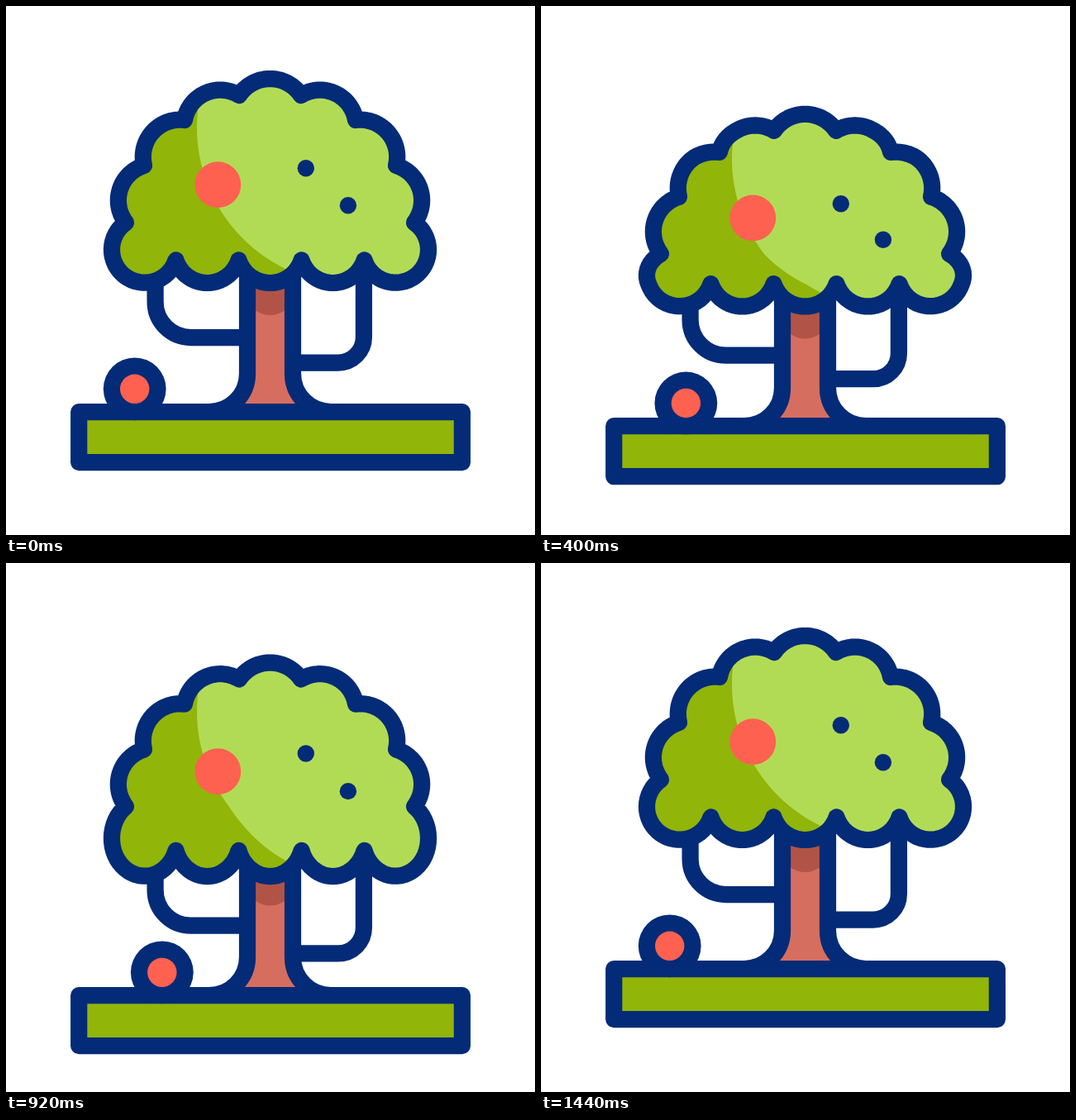
An HTML page with a canvas that plays this animation: 640x640 px, repeating every 1480 ms.

```html
<!DOCTYPE html>
<html lang="en">
<head>
<meta charset="utf-8">
<title>Tree</title>
<style>
html, body { margin: 0; width: 100%; height: 100%; overflow: hidden; background: #fff; }
canvas { display: block; width: 640px; height: 640px; }
</style>
</head>
<body>
<canvas id="stage" width="640" height="640"></canvas>
<script>
const ctx = document.getElementById('stage').getContext('2d');
const LOOP = 1480, STEP = 40, LINE = 20.25, MID = 319.5;
const NAVY = '#042b77', LIGHT = '#b2db55', DARK = '#91b508';
const RED = '#ff6150', BARK = '#d66e5f', SHADE = '#b15447';

const clamp01 = v => Math.min(1, Math.max(0, v));
const smooth = u => u * u * (3 - 2 * u);
const ramp = (t, from, to) => smooth(clamp01((t - from) / (to - from)));
// Rises from start to top, then falls back to zero at end.
const pulse = (t, size, start, top, end) =>
  size * (t < top ? ramp(t, start, top) : 1 - ramp(t, top, end));

// Bezier ease with flat ends; x1 and x2 set the influence of each end.
function ease(x, x1, x2) {
  let lo = 0, hi = 1;
  for (let i = 0; i < 24; i++) {
    const s = (lo + hi) / 2, r = 1 - s;
    if (3 * r * r * s * x1 + 3 * r * s * s * x2 + s * s * s < x) lo = s; else hi = s;
  }
  return smooth(lo);
}

const sink = t => 36 * (t < 725
  ? ramp(t, 95, 725)
  : 1 - ease(clamp01((t - 720) / 720), 0.6, 0.35));

// Left half of the crown, from the top centre down: lobe centre, then the notch that ends it.
const LOBES = [
  [259, 145.5, 216, 138],
  [211, 182, 167, 193],
  [180, 235, 145, 262],
  [168, 295, 205.5, 307.5],
  [243.5, 295, 281.5, 307.5]
];

function arcPoints(cx, cy, from, to) {
  const a0 = Math.atan2(from[1] - cy, from[0] - cx);
  let a1 = Math.atan2(to[1] - cy, to[0] - cx);
  if (a1 > a0) a1 -= 2 * Math.PI;
  const r0 = Math.hypot(from[0] - cx, from[1] - cy);
  const r1 = Math.hypot(to[0] - cx, to[1] - cy);
  return Array.from({ length: 33 }, (_, i) => {
    const k = i / 32, a = a0 + (a1 - a0) * k, r = r0 + (r1 - r0) * k;
    return [cx + r * Math.cos(a), cy + r * Math.sin(a)];
  });
}

function crownOutline() {
  const first = [282, 108], left = [];
  let last = first;
  for (const [cx, cy, x, y] of LOBES) {
    left.push(...arcPoints(cx, cy, last, [x, y]));
    last = [x, y];
  }
  const mirror = ([x, y]) => [2 * MID - x, y];
  return [
    ...arcPoints(MID, 133.2, mirror(first), first),
    ...left,
    ...arcPoints(MID, 295, last, mirror(last)),
    ...left.map(mirror).reverse()
  ];
}

const CROWN = crownOutline();
const GLOW = Array.from({ length: 181 }, (_, i) => {
  const a = i * Math.PI / 90;
  return [421 + 190 * Math.cos(a), 147 + 190 * Math.sin(a)];
});

// The upper crown leads and the lower edge follows, which squashes and stretches it.
function crownWarp(t) {
  const top = pulse(t, 28, 120, 460, 960);
  const mid = pulse(t, 25, 120, 500, 960);
  const notch = pulse(t, 24, 140, 680, 1080);
  const low = pulse(t, 24, 140, 680, 1160);
  const stops = [[108, top], [145, mid], [262, mid], [308, notch], [335, low]];
  const shift = y => {
    if (y <= stops[0][0]) return top;
    for (let i = 1; i < stops.length; i++) {
      const [y0, d0] = stops[i - 1], [y1, d1] = stops[i];
      if (y <= y1) return d0 + (d1 - d0) * (y - y0) / (y1 - y0);
    }
    return low;
  };
  return { shift, notch };
}

function tracePoints(points, shift) {
  ctx.beginPath();
  for (const [x, y] of points) ctx.lineTo(x, y + shift(y));
  ctx.closePath();
}

function disc(x, y, r, color) {
  ctx.beginPath();
  ctx.arc(x, y, r, 0, 2 * Math.PI);
  ctx.fillStyle = color;
  ctx.fill();
}

function drawBranch(x, y, r, trunkX) {
  ctx.beginPath();
  ctx.moveTo(x, 330);
  ctx.arcTo(x, y, trunkX, y, r);
  ctx.lineTo(trunkX, y);
  ctx.stroke();
}

function drawTrunk(shadeShift) {
  const trace = () => {
    ctx.beginPath();
    ctx.moveTo(292, 315);
    ctx.lineTo(292, 445);
    ctx.arc(246, 445, 46, 0, Math.PI / 2);
    ctx.moveTo(393, 491);
    ctx.arc(393, 445, 46, Math.PI / 2, Math.PI);
    ctx.lineTo(347, 315);
  };
  ctx.beginPath();
  ctx.moveTo(292, 315);
  ctx.lineTo(292, 445);
  ctx.quadraticCurveTo(292, 472, 279, 491);
  ctx.lineTo(360, 491);
  ctx.quadraticCurveTo(347, 472, 347, 445);
  ctx.lineTo(347, 315);
  ctx.fillStyle = BARK;
  ctx.fill();

  const edge = 368.5 + shadeShift;
  ctx.beginPath();
  ctx.moveTo(302, 315);
  ctx.lineTo(302, edge);
  ctx.quadraticCurveTo(MID, edge + 11, 337, edge);
  ctx.lineTo(337, 315);
  ctx.fillStyle = SHADE;
  ctx.fill();

  trace();
  ctx.stroke();
}

function drawGround() {
  ctx.beginPath();
  ctx.rect(88.2, 491.1, 463.7, 61);
  ctx.fillStyle = DARK;
  ctx.fill();
  ctx.stroke();
}

function drawCrown(t, shift) {
  tracePoints(CROWN, shift);
  ctx.fillStyle = DARK;
  ctx.fill();
  ctx.save();
  ctx.clip();
  tracePoints(GLOW, shift);
  ctx.fillStyle = LIGHT;
  ctx.fill();
  ctx.restore();
  tracePoints(CROWN, shift);
  ctx.stroke();

  disc(256.3, 216.2 + pulse(t, 33, 120, 560, 1020), 27.9, RED);
  disc(362.8, 196.2 + pulse(t, 33.5, 120, 525, 995), 10.2, NAVY);
  disc(413.9, 241.2 + pulse(t, 33, 120, 540, 1005), 10.2, NAVY);
}

function draw(t) {
  const { shift, notch } = crownWarp(t);
  ctx.fillStyle = '#fff';
  ctx.fillRect(0, 0, 640, 640);
  ctx.save();
  ctx.translate(0, sink(t));
  ctx.strokeStyle = NAVY;
  ctx.lineWidth = LINE;
  ctx.lineCap = ctx.lineJoin = 'round';

  drawBranch(180.6, 401 + pulse(t, 9.5, 120, 700, 1200), 43, 292);
  drawBranch(432.9, 431.5 + pulse(t, 11, 240, 760, 1320), 31, 347);
  drawTrunk(notch);
  drawGround();

  const ballX = 155.7 + pulse(t, 65, 212, 727, 1118);
  disc(ballX, 463.3, 37.9, NAVY);
  disc(ballX, 463.3, 17.7, RED);

  drawCrown(t, shift);
  ctx.restore();
}

function tick() {
  const t = performance.now() % LOOP;
  draw(Math.floor(t / STEP) * STEP);
  requestAnimationFrame(tick);
}
tick();
</script>
</body>
</html>
```
